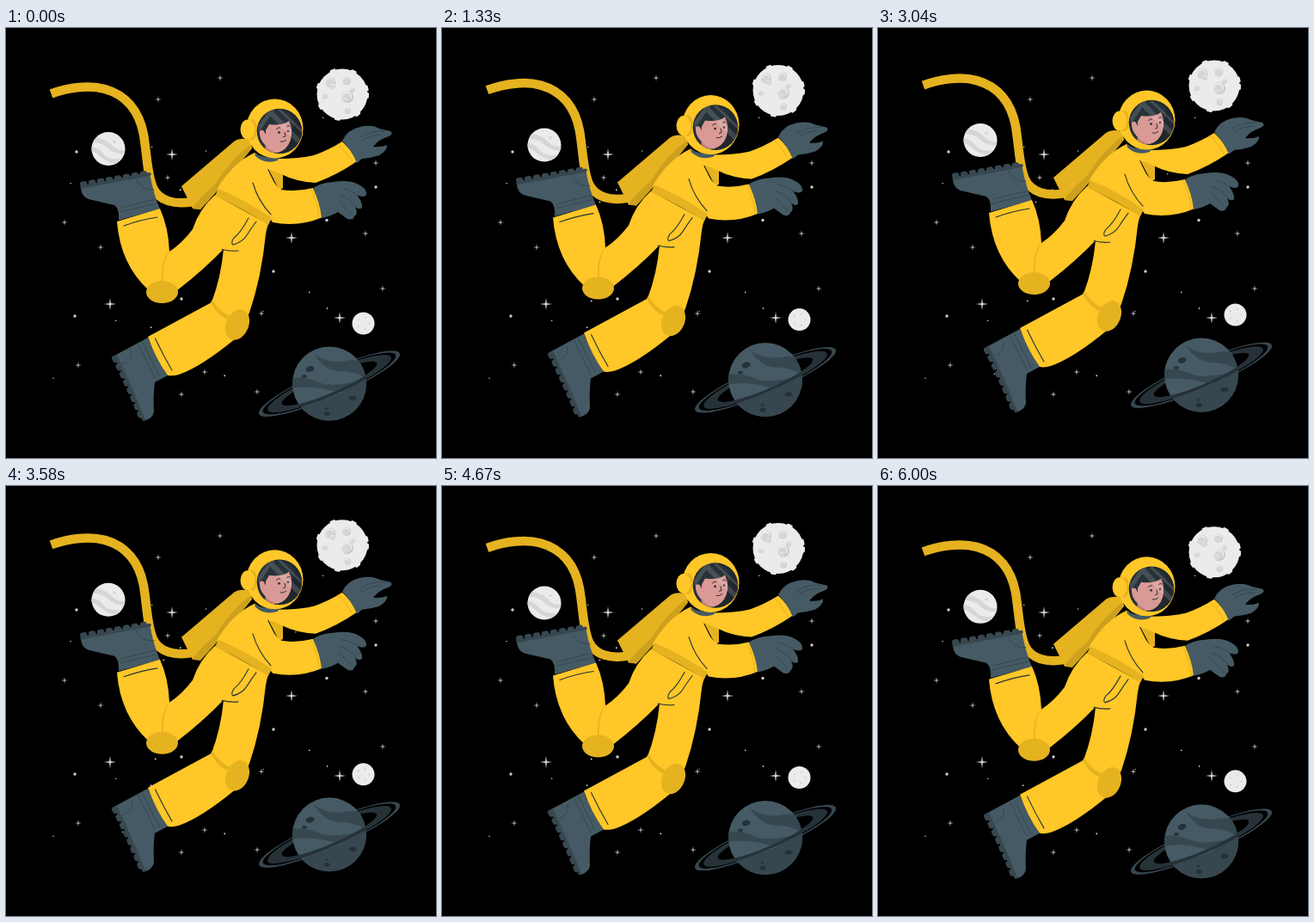
Write an HTML page that moves like this. It is 500x500 px and loops after 6040 ms.

```html
<!DOCTYPE html>
<html lang="en">
<head>
<meta charset="utf-8">
<title>Floating astronaut</title>
<style>
  html, body { margin: 0; height: 100%; overflow: hidden; background: #000; }
  svg { display: block; width: 100vw; height: 100vh; }
  .y { fill: #ffc727; } .dy { fill: #e5b220; } .sy { fill: #cda01d; }
  .s { fill: #455a64; } .ds { fill: #37474f; } .k { fill: #263238; }
  .w { fill: #ebebeb; } .g { fill: #d6d6d6; } .dg { fill: #c4c4c4; }
  .line, .fold, .seam, .sole, .teeth { fill: none; stroke-linecap: round; }
  .line { stroke: #263238; stroke-width: 1.1; }
  .fold { stroke: #37474f; }
  .seam { stroke: #e5b220; }
  .sole { stroke: #37474f; stroke-width: 3.5; }
  .teeth { stroke: #37474f; stroke-width: 6; stroke-dasharray: 2.5 7.6; }
</style>
</head>
<body>
<svg viewBox="0 0 500 500">
  <defs>
    <clipPath id="disc"><circle cx="376" cy="413.5" r="43"/></clipPath>
    <clipPath id="globe"><circle cx="119" cy="140.5" r="19.5"/></clipPath>
    <clipPath id="glass"><circle cx="318" cy="120" r="26.3"/></clipPath>
    <clipPath id="front"><rect x="-95" width="190" height="95"/></clipPath>
    <g id="ring" fill="none">
      <circle r="86.5" stroke="#37474f" stroke-width="5"/>
      <circle r="69" stroke="#263238" stroke-width="18"/>
    </g>
  </defs>

  <g id="stars" class="w" opacity=".88"></g>

  <g id="float">
    <g id="moon" transform="translate(391 77)"><circle class="w" r="29.5"/></g>

    <!-- striped planet -->
    <circle class="w" cx="119" cy="140.5" r="19.5"/>
    <g class="g" clip-path="url(#globe)">
      <path d="M104 127Q118 130 124 137T141 142L139 147Q126 147 119 140T100 133Z"/>
      <path d="M98 138Q107 138 113 146T133 152L128 158Q116 156 109 149T98 145Z"/>
      <circle cx="126" cy="132" r="1.8"/>
    </g>

    <!-- small moon -->
    <g id="pebble" transform="translate(415.5 343.5)"><circle class="w" r="13"/></g>

    <!-- ringed planet -->
    <g transform="translate(376 413.5) rotate(-23.3) scale(1 .18)"><use href="#ring"/></g>
    <circle class="s" cx="376" cy="413.5" r="43"/>
    <g class="ds" clip-path="url(#disc)">
      <path d="M358 379Q375 391 395 387T420 396V408Q405 399 388 399T358 379Z"/>
      <path d="M330 407Q350 405 364 412T420 408V418Q395 427 375 421T330 419Z"/>
      <path d="M330 438Q365 438 420 410V460H330Z"/>
    </g>
    <g transform="translate(376 413.5) rotate(-23.3) scale(1 .18)"><use href="#ring" clip-path="url(#front)"/></g>
    <g class="k">
      <ellipse cx="353.5" cy="396.5" rx="5" ry="3.3" transform="rotate(-15 353 396)"/>
      <ellipse cx="347" cy="405" rx="3" ry="1.9"/><ellipse cx="403" cy="430.5" rx="4.5" ry="2.8"/>
      <ellipse cx="373" cy="448.5" rx="3.5" ry="2.6"/><circle cx="372.5" cy="442.5" r="1.6"/>
    </g>

    <!-- tether -->
    <path d="M52.500 76.500C73 69 97 66 115 71C140 78 155 97 160 124C164 148 164 170 171 186C178 201 196 206 217 202" fill="none" stroke="#e5b220" stroke-width="10.500"/>

    <!-- backpack -->
    <path class="dy" d="M204 184L265 132Q272 127 284 130L286 140L245 190L226 211L217 210Z"/>
    <path class="sy" d="M217 210Q222 200 243 182Q262 152 284 136V142L245 190L226 211Z"/>

    <!-- far boot -->
    <path class="teeth" d="M89 181.500L167 168"/>
    <path class="s" d="M87 184L167 168Q171 192 179 210.500L131 223.500Q132 210 126 206L98 199.500Q87 197 87 184Z"/>
    <path class="sole" d="M88 185L167 170"/>
    <path class="fold" d="M152 176Q156 189 172 188M134 209L174 199M133 214L175 204"/>

    <!-- near boot -->
    <path class="teeth" d="M126 384Q144 420 158 455"/>
    <path class="s" d="M126 381L165 360Q175 386 188 404L173 412Q171 428 172 446Q171 454 160 457Z"/>
    <path class="sole" d="M128 382Q146 420 160 455"/>
    <path class="fold" d="M146 375Q149 386 136 391M154 368L173 407M159 366L178 405"/>

    <!-- legs -->
    <path class="y" d="M243 194L305 228Q303 233 302 240Q297 290 283 331L267 361Q227 394 201 403Q194 405 188 404Q174 385 165 359L239 319Q250 290 253 257Q229 282 199 305L166 305Q133 275 129 225L179 210Q189 232 190 260Q205 250 217 234Q225 210 243 194Z"/>
    <path class="dy" d="M191 258Q181 272 183 296H181Q180 270 190 259Z"/>
    <path class="dy" d="M240 316L238 319Q245 333 257 339L260 335Q247 329 240 316Z"/>
    <ellipse class="dy" cx="181.500" cy="307" rx="18.500" ry="13"/>
    <ellipse class="dy" cx="269" cy="345" rx="13" ry="18.500" transform="rotate(24 269 345)"/>
    <path class="line" d="M137 230Q156 223 176 220M173.500 361Q183 381 193 398M282 221Q273 238 265 244Q261 250 264 252Q275 249 280 241T291 225M251 257.500Q260 260 270 259"/>

    <!-- far arm -->
    <path class="dy" d="M304 162L322 168V186L318 189Z"/>
    <path class="y" d="M314 152Q342 152 358 148Q375 142 391 132Q402 142 408 155Q385 171 360 180Q338 179 320 170L305 163Z"/>
    <path class="seam" d="M386 135Q397 145 403 158"/>
    <path class="s" d="M391 131Q397 118 412 115Q425 112 434 117L447 120Q451 123 445 126Q434 129 427 138Q436 139 443 136Q444 142 434 148Q425 151 414 152L408 157Q402 142 391 131Z"/>
    <path class="fold" d="M412 127Q423 119 441 120M414 131Q424 124 437 124"/>

    <!-- torso and near arm -->
    <path class="y" d="M245 188Q263 157 289 145Q302 155 316 152L318 168L304 164L317 190L309 222Z"/>
    <path class="y" d="M287 178L304 164Q309 180 320 188Q337 191 357 186Q365 202 368 220Q340 232 310 226Q296 208 287 178Z"/>
    <path class="dy" d="M247 187Q278 200 309 221L305 229Q277 211 243 195Z"/>
    <path class="line" d="M287 180Q293 201 308 217"/>
    <path class="seam" d="M355 188Q363 203 364 221"/>
    <path class="s" d="M357 186Q366 180 380 179Q400 176 410 182Q420 187 419 194Q416 198 408 194Q415 203 414 209Q411 212 406 208Q410 216 405 219Q404 224 397 222L386 214Q378 219 367 221Q365 203 357 186Z"/>
    <path class="fold" d="M391 187Q402 188 409 195M388 194Q400 198 407 208M387 201Q394 209 402 217"/>

    <!-- helmet -->
    <path class="s" d="M289 146Q302 152 318 150L316 154Q301 159 290 149Z"/>
    <ellipse class="y" cx="312.500" cy="117" rx="33" ry="34.500"/>
    <ellipse class="dy" cx="286" cy="118" rx="6" ry="12"/>
    <ellipse class="y" cx="281" cy="118" rx="8.500" ry="11.500"/>
    <circle cx="318" cy="120" r="26.300" fill="#20282d"/>
    <g clip-path="url(#glass)">
      <path class="k" d="M293 126Q292 107 304 98Q319 91 332 101Q338 109 333 117L300 141Q294 137 293 126Z"/>
      <path fill="#d99a96" d="M302 119L306 112Q321 114 329 108Q334 118 331 130Q327 142 316 145Q305 145 302 137Q294 129 295 120Q299 116 302 124Z"/>
      <path fill="#c6807e" d="M301 137Q309 143 314 145L304 148Z"/>
      <path d="M314 118Q316 115 319 116M326 115Q328 113 330 114M324 121L325 126L322 127M319 132Q323 133 326 130" fill="none" stroke="#263238"/>
      <circle class="k" cx="317.500" cy="121.500" r="1.400"/><circle class="k" cx="328" cy="120" r="1.300"/>
      <path fill="#fff" opacity=".14" d="M293 114L309 92H314L294 122ZM310 96L346 133L343 138L305 100ZM319 94L347 121V125L316 95Z"/>
    </g>
  </g>
</svg>
<script>
const LOOP = 6040, LIFT = 10;
const byId = id => document.getElementById(id);
const add = (id, items) => byId(id).innerHTML += items.join("");
const circle = (x, y, r, cls = "") => `<circle class="${cls}" cx="${x}" cy="${y}" r="${r}"/>`;
const times = (n, make) => Array.from({ length: n }, (_, i) => make(i));

let seed = 7;
const random = (lo, hi) => {
  seed = seed * 16807 % 2147483647;
  return lo + (hi - lo) * seed / 2147483647;
};

// Moon: bumps around the rim, craters lit from the lower left
add("moon", times(8, i =>
  `<rect class="w" x="26" y="-3.5" width="5" height="7" rx="1.5" transform="rotate(${i * 49 + 3})"/>`));
const crater = (x, y, r) =>
  circle(x, y, r, "dg") + circle(x - r * .1, y - r * .1, r * .88, "w") + circle(x - r * .1, y + r * .1, r * .72, "g");
add("moon", [crater(-14, -14, 6), crater(5, -16, 5), crater(6, 3, 7), crater(6, 19, 4)]);
add("moon", times(4, i => crater(-4 + 18 * Math.cos(i * 1.6 - .5), -1 + 9 * Math.sin(i * 1.6 - .5), 3)));

add("pebble", times(5, i => circle(7 * Math.cos(i * 1.26), 7 * Math.sin(i * 1.26), 1.2, "g")));

// Sky: large and small sparkles, bright dots, then faint scattered dust
const sparkle = (x, y, r) => {
  const q = r * .14;
  const points = times(8, i => {
    const d = i % 2 ? q * Math.SQRT2 : r, a = i * Math.PI / 4;
    return [x + d * Math.cos(a), y + d * Math.sin(a)];
  });
  return `<polygon points="${points}"/>`;
};
const large = [[193, 147], [332, 244], [388, 337], [121, 321]];
const small = [[177, 83], [249, 58], [188, 174], [68, 226], [110, 255], [418, 239], [438, 303],
  [297, 332], [84, 392], [231, 400], [204, 426], [292, 423], [430, 157]];
const bright = [[82, 144], [430, 185], [373, 223.5], [311, 283], [80, 335], [204, 315]];
add("stars", large.map(([x, y]) => sparkle(x, y, 7)));
add("stars", small.map(([x, y]) => sparkle(x, y, 4)));
add("stars", bright.map(([x, y]) => circle(x, y, 1.7)));
add("stars", times(24, () => circle(random(55, 400), random(85, 435), random(.6, 1))));

// Everything but the sky rises and sinks at a steady speed
function draw(now) {
  const phase = now % LOOP / LOOP;
  const rise = LIFT * (1 - Math.abs(1 - 2 * phase));
  byId("float").setAttribute("transform", `translate(0 ${-rise})`);
  requestAnimationFrame(draw);
}
draw(0);
</script>
</body>
</html>
```
